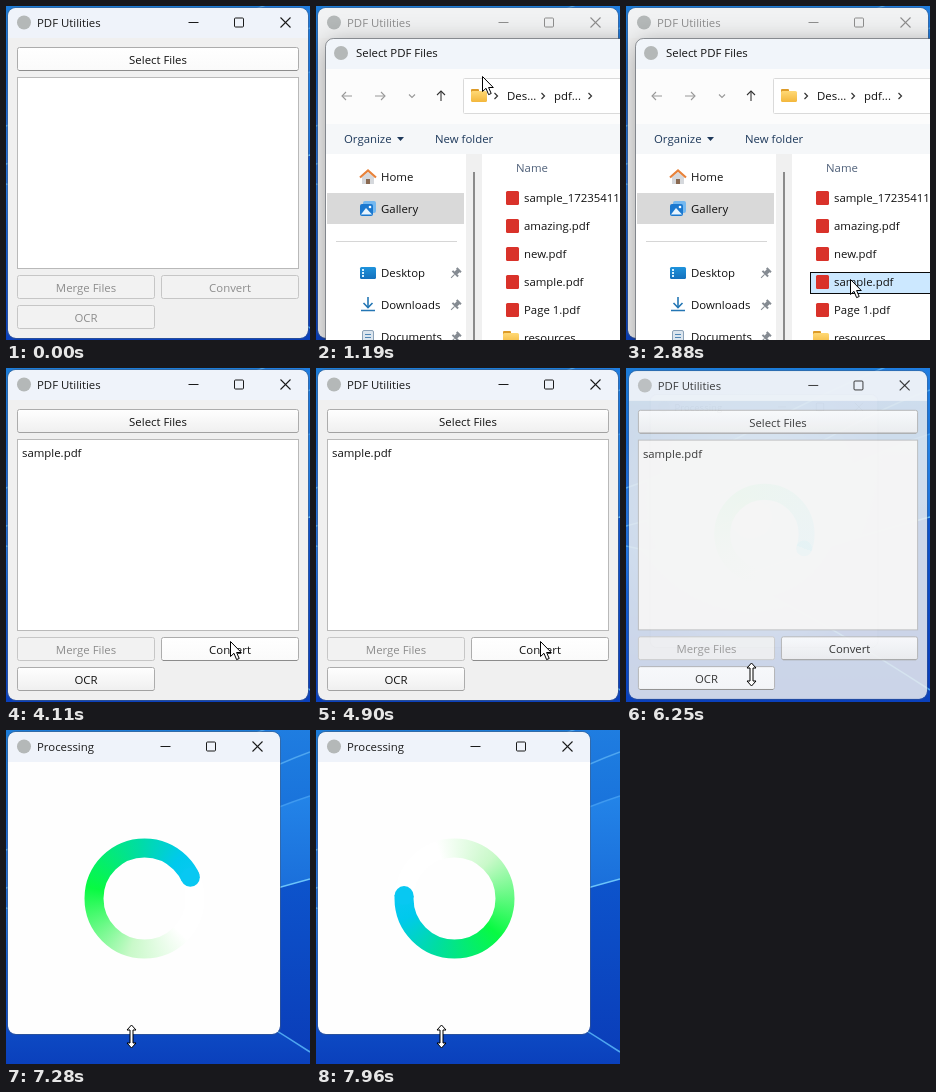
An HTML page with a canvas that plays this animation: 304 by 334 pixels, repeating every 7990 ms.

```html
<!DOCTYPE html>
<html lang="en">
<head>
<meta charset="utf-8">
<title>PDF Utilities</title>
<style>
html, body { margin: 0; width: 304px; height: 334px; overflow: hidden; background: #1763c8; }
canvas { display: block; }
</style>
</head>
<body>
<canvas id="stage" width="304" height="334"></canvas>
<script>
const W = 304, H = 334, LOOP = 7990;
const c = document.getElementById('stage').getContext('2d');
const FONT = '"Open Sans", "Noto Sans", sans-serif';

const clamp = v => Math.max(0, Math.min(1, v));
const span = (t, a, b) => clamp((t - a) / (b - a));
const easeOut = p => 1 - (1 - p) ** 3;
const easeIn = p => p * p;
const smooth = p => p * p * (3 - 2 * p);
const lerp = (a, b, p) => a + (b - a) * p;

function rect(x, y, w, h, fill) {
  c.fillStyle = fill;
  c.fillRect(x, y, w, h);
}

function box(x, y, w, h, r, fill, stroke) {
  c.beginPath();
  c.roundRect(x, y, w, h, r);
  if (fill) { c.fillStyle = fill; c.fill(); }
  if (stroke) { c.lineWidth = 1; c.strokeStyle = stroke; c.stroke(); }
}

function line(color, width, ...pts) {
  c.beginPath();
  for (let i = 0; i < pts.length; i += 2) c.lineTo(pts[i], pts[i + 1]);
  c.strokeStyle = color;
  c.lineWidth = width;
  c.stroke();
}

function poly(fill, ...pts) {
  c.beginPath();
  for (let i = 0; i < pts.length; i += 2) c.lineTo(pts[i], pts[i + 1]);
  c.closePath();
  c.fillStyle = fill;
  c.fill();
}

function disc(x, y, r, fill) {
  c.beginPath();
  c.arc(x, y, r, 0, 7);
  c.fillStyle = fill;
  c.fill();
}

function text(s, x, y, color = '#111', align = 'left', size = 11.4) {
  c.font = size + 'px ' + FONT;
  c.textAlign = align;
  c.fillStyle = color;
  c.fillText(s, x, y + 4);
}

function vGrad(y0, y1, ...stops) {
  const g = c.createLinearGradient(0, y0, 0, y1);
  stops.forEach((s, i) => g.addColorStop(i / (stops.length - 1), s));
  return g;
}

// Draws a layer scaled about a point with an opacity.
function layer(alpha, scale, cx, cy, draw) {
  if (alpha <= 0) return;
  c.save();
  c.globalAlpha = alpha;
  c.translate(cx, cy);
  c.scale(scale, scale);
  c.translate(-cx, -cy);
  draw();
  c.restore();
}

// Wallpaper petal: a curved top edge, filled down to the bottom of the stage.
function petal(x0, y0, x1, y1, x2, y2, x3, y3, top, bottom, edge) {
  const curve = () => {
    c.beginPath();
    c.moveTo(x0, y0);
    c.bezierCurveTo(x1, y1, x2, y2, x3, y3);
  };
  curve();
  c.lineTo(W, H);
  c.lineTo(0, H);
  c.closePath();
  c.fillStyle = vGrad(Math.min(y0, y3), H, top, bottom);
  c.fill();
  curve();
  c.strokeStyle = edge;
  c.lineWidth = 1.5;
  c.stroke();
}

function wallpaper() {
  rect(0, 0, W, H, vGrad(0, H, '#1c7cd8', '#0f55cc', '#0a30b0'));
  petal(0, 120, 90, 90, 170, 30, 304, -18, '#2080e2', '#0a48c4', '#4ea6f0');
  petal(0, 158, 120, 130, 200, 60, 304, 22, '#1d7ce0', '#0a48c4', '#4ea6f0');
  petal(0, 190, 120, 160, 200, 100, 304, 66, '#2384e8', '#0a46c0', '#3f9af0');
  petal(0, 270, 90, 210, 190, 180, 304, 149, '#0d54cc', '#0a3cb8', '#6cc4fa');
  petal(0, 178, 110, 200, 200, 255, 304, 322, '#1a70e0', '#0a40bc', '#4ea6f0');
  const glow = c.createRadialGradient(125, 150, 0, 125, 150, 145);
  glow.addColorStop(0, 'rgba(190,235,255,.75)');
  glow.addColorStop(.5, 'rgba(150,210,255,.45)');
  glow.addColorStop(1, 'rgba(120,190,255,0)');
  rect(0, 0, W, H, glow);
}

function caption(title, right, ink, bg) {
  rect(2, 2, right - 2, 30, bg);
  disc(18, 16.5, 7, '#b4b8b8');
  text(title, 31, 17, ink);
  const x = right - 119.5;
  line(ink, 1, x, 16.5, x + 10, 16.5);
  box(x + 46, 12, 9, 9, 1, null, ink);
  line(ink, 1.1, x + 92, 11.5, x + 102, 21.5);
  line(ink, 1.1, x + 102, 11.5, x + 92, 21.5);
}

function frame(w, h, fill, inside) {
  c.save();
  c.beginPath();
  c.roundRect(2, 2, w, h, 8);
  c.clip();
  rect(2, 2, w, h, fill);
  inside();
  c.restore();
  box(1.5, 1.5, w + 1, h + 1, 8, null, 'rgba(70,90,120,.5)');
}

function button(label, x, y, w, on, hot) {
  box(x + .5, y + .5, w - 1, 23, 2,
    on ? vGrad(y, y + 24, '#ffffff', hot ? '#fafafa' : '#efefef') : '#f2f2f2',
    on ? '#acacac' : '#c6c6c6');
  if (on) line(hot ? '#8c8c8c' : '#a2a2a2', 1, x + 2, y + 23.5, x + w - 2, y + 23.5);
  text(label, x + w / 2, y + 13, on ? '#111' : '#8c8c8c', 'center');
}

function mainWindow(s) {
  frame(300, 330, '#f0f0f0', () => {
    caption('PDF Utilities', 302, s.active ? '#1a1a1a' : '#8e8e8e', s.active ? '#eff3fa' : '#f1f2f3');
    button('Select Files', 11, 41, 282, true, s.hot === 0);
    rect(11, 71, 282, 192, '#b9b9b9');
    rect(12, 72, 280, 190, '#fff');
    if (s.loaded) text('sample.pdf', 16, 85);
    button('Merge Files', 11, 269, 138, false);
    button('Convert', 155, 269, 138, s.loaded, s.hot === 1);
    button('OCR', 11, 299, 138, s.loaded, s.hot === 2);
  });
}

function arrow(x, y, dx, dy, color) {
  const px = -dy, py = dx;
  line(color, 1.1, x - dx * 5, y - dy * 5, x + dx * 5, y + dy * 5);
  line(color, 1.1, x + dx + px * 4, y + dy + py * 4, x + dx * 5, y + dy * 5, x + dx - px * 4, y + dy - py * 4);
}

function chevron(x, y) {
  line('#333', 1.2, x - 1.5, y - 3, x + 1.5, y, x - 1.5, y + 3);
}

function folder(x, y) {
  box(x, y, 8, 6, 1, '#dd9b28');
  box(x, y + 2, 16, 11, 1.5, vGrad(y + 2, y + 13, '#ffd976', '#f3b73c'));
}

function pin(x, y) {
  c.save();
  c.translate(x, y);
  c.rotate(Math.PI / 4);
  rect(-3, -5, 6, 2, '#858b92');
  rect(-2, -4, 4, 5, '#858b92');
  rect(-4, 0, 8, 2, '#858b92');
  rect(-.5, 2, 1, 5, '#858b92');
  c.restore();
}

function sidebar() {
  rect(11, 187, 137, 31, '#d9d9d9');
  poly('#d5d8dc', 46, 171, 52, 166, 58, 171, 58, 178, 46, 178);
  rect(50, 173, 4, 5, '#8a6a52');
  line('#e8823a', 2.2, 44, 171.5, 52, 164.5, 60, 171.5);
  text('Home', 65, 171);
  box(47, 195, 13, 12, 2, '#75b8ef');
  box(44, 198, 13, 12, 2, '#1b78cf');
  poly('#e6f4ff', 45, 208.5, 50, 202, 56, 208.5);
  disc(54, 201, 1.3, '#fff');
  text('Gallery', 65, 203);
  line('#d6d6d6', 1, 20, 235.5, 141, 235.5);

  box(44, 261, 16, 12, 1.5, vGrad(261, 273, '#1f93dc', '#1470bc'));
  for (const y of [263, 266, 269]) rect(46, y, 2, 2, '#d4f0ff');
  text('Desktop', 65, 267);
  const blue = '#2476b4';
  line(blue, 1.6, 52, 291, 52, 301);
  line(blue, 1.6, 47.5, 297, 52, 301.5, 56.5, 297);
  line(blue, 1.6, 45, 304.5, 59, 304.5);
  text('Downloads', 65, 299);
  box(46.5, 324.5, 11, 14, 1.5, '#dbe5ee', '#8ba2b8');
  for (const y of [328, 331]) rect(49, y, 6, 1, '#4f86b5');
  text('Documents', 65, 331);
  for (const y of [267, 299, 331]) pin(140, y);
}

const FILES = ['sample_1723541156.pdf', 'amazing.pdf', 'new.pdf', 'sample.pdf', 'Page 1.pdf', 'resources'];

function fileList(s) {
  text('Name', 200, 162, '#50617a');
  FILES.forEach((name, i) => {
    const y = 192 + 28 * i;
    if (i === s.picked) {
      rect(184, y - 10, 130, 22, '#0a0a0a');
      rect(185, y - 9, 130, 20, '#cce8ff');
    } else if (i === s.row) {
      rect(184, y - 10, 130, 22, '#e5f3ff');
    }
    if (i === 5) folder(187, y - 7);
    else box(190, y - 7, 13, 14, 1.5, '#d9322a');
    text(name, 208, y);
  });
}

function dialog(s) {
  c.save();
  c.shadowColor = 'rgba(0,0,0,.35)';
  c.shadowBlur = 24;
  c.shadowOffsetY = 4;
  box(10, 33, 640, 440, 8, '#fff');
  c.restore();

  c.save();
  c.beginPath();
  c.roundRect(10, 33, 640, 440, 8);
  c.clip();
  rect(10, 33, 640, 440, '#fff');
  rect(10, 33, 640, 30, '#f1f5fa');
  disc(25, 47, 7, '#b4b8b8');
  text('Select PDF Files', 40, 47);

  rect(10, 63, 640, 55, '#fcfcfc');
  arrow(31, 90, -1, 0, '#999');
  arrow(64, 90, 1, 0, '#999');
  line('#999', 1.1, 93, 88.5, 96, 91.5, 99, 88.5);
  arrow(125, 90, 0, -1, '#333');
  box(147.5, 72.5, 300, 35, 1, '#fff', '#dadada');
  folder(155, 83);
  chevron(180, 90);
  text('Des...', 191, 90);
  chevron(227, 90);
  text('pdf...', 238, 90);
  chevron(274, 90);

  rect(10, 118, 640, 30, '#f5f7f9');
  text('Organize', 28, 133, '#1e395b');
  poly('#1e395b', 81, 131, 88, 131, 84.5, 135);
  text('New folder', 119, 133, '#1e395b');

  rect(150, 148, 16, 330, '#f0f0f0');
  rect(157, 166, 2, 260, '#8b8b8b');
  sidebar();
  if (s.listed) fileList(s);
  c.restore();
  box(9.5, 32.5, 641, 441, 8, null, 'rgba(95,100,110,.65)');
}

function spinner(t) {
  const x = 138.5, y = 168.5, r = 50.5;
  const head = (136 + (t - 6630) * .306) * Math.PI / 180;
  const g = c.createConicGradient(head, x, y);
  g.addColorStop(0, '#fff');
  g.addColorStop(.19, '#fff');
  g.addColorStop(.36, '#c9f9c9');
  g.addColorStop(.6, '#08fa42');
  g.addColorStop(.8, '#00dda2');
  g.addColorStop(.93, '#00c9ec');
  g.addColorStop(1, '#08c8f2');
  c.beginPath();
  c.arc(x, y, r, 0, 7);
  c.lineWidth = 19;
  c.strokeStyle = g;
  c.stroke();
  disc(x + r * Math.cos(head), y + r * Math.sin(head), 9.5, '#08c8f2');
}

function processing(t) {
  frame(272, 302, '#fefefe', () => {
    caption('Processing', 274, '#1a1a1a', '#eff3fa');
    spinner(t);
  });
}

const pointer = new Path2D('M.5 .5V15.5L4 12.3L6.6 18.6L9.2 17.5L6.6 11.5H11.3Z');
const resizer = new Path2D('M0 -11.5L4.5 -6.5H1.5V6.5H4.5L0 11.5L-4.5 6.5H-1.5V-6.5H-4.5Z');

function stamp(path, x, y) {
  c.save();
  c.translate(x, y);
  c.lineJoin = 'round';
  c.lineWidth = 1;
  c.fillStyle = '#fff';
  c.strokeStyle = '#000';
  c.fill(path);
  c.stroke(path);
  c.restore();
}

// Pointer path: time, x, y
const MOVES = [
  [990, 160, 56], [1770, 198, 142], [1980, 200, 89], [2570, 222, 268],
  [2860, 224, 273], [4900, 224, 273], [5290, 125, 305]
];

function pointerAt(t) {
  let i = 0;
  while (i < MOVES.length - 2 && t > MOVES[i + 1][0]) i++;
  const [t0, x0, y0] = MOVES[i], [t1, x1, y1] = MOVES[i + 1];
  const p = smooth(span(t, t0, t1));
  return [Math.round(lerp(x0, x1, p)), Math.round(lerp(y0, y1, p))];
}

function draw(t) {
  const [mx, my] = pointerAt(t);
  const shown = t >= 990 && t < 5730;
  wallpaper();

  if (t < 6450) {
    let hot = -1;
    if (t < 190) hot = 0;
    else if (t > 3900 && mx > 155 && my < 293) hot = 1;
    else if (t > 4900 && mx < 149 && my > 298) hot = 2;
    const out = span(t, 6190, 6430);
    layer(1 - smooth(out), 1 - .1 * easeIn(out), 152, 167, () =>
      mainWindow({ active: t < 30 || t >= 3760, loaded: t >= 4080, hot }));
  }

  if (t >= 190 && t < 3960) {
    const inn = easeOut(span(t, 190, 460));
    const out = easeIn(span(t, 3720, 3940));
    const row = mx > 165 && my > 180 && shown ? Math.floor((my - 178) / 28) : -1;
    layer(inn * (1 - out), .9 + .1 * inn - .1 * out, 330, 253, () =>
      dialog({ listed: t > 700, row, picked: t >= 2700 ? 3 : -1 }));
  }

  if (t >= 6230) {
    const p = easeOut(span(t, 6230, 6560));
    layer(p * p, .8 + .2 * p, 138, 153, () => processing(t));
  }

  if (shown) stamp(pointer, mx, my);
  if (t >= 6200) stamp(resizer, 125.5, 306.5);
}

const start = performance.now();
function tick() {
  draw((performance.now() - start) % LOOP);
  requestAnimationFrame(tick);
}
tick();
</script>
</body>
</html>
```
